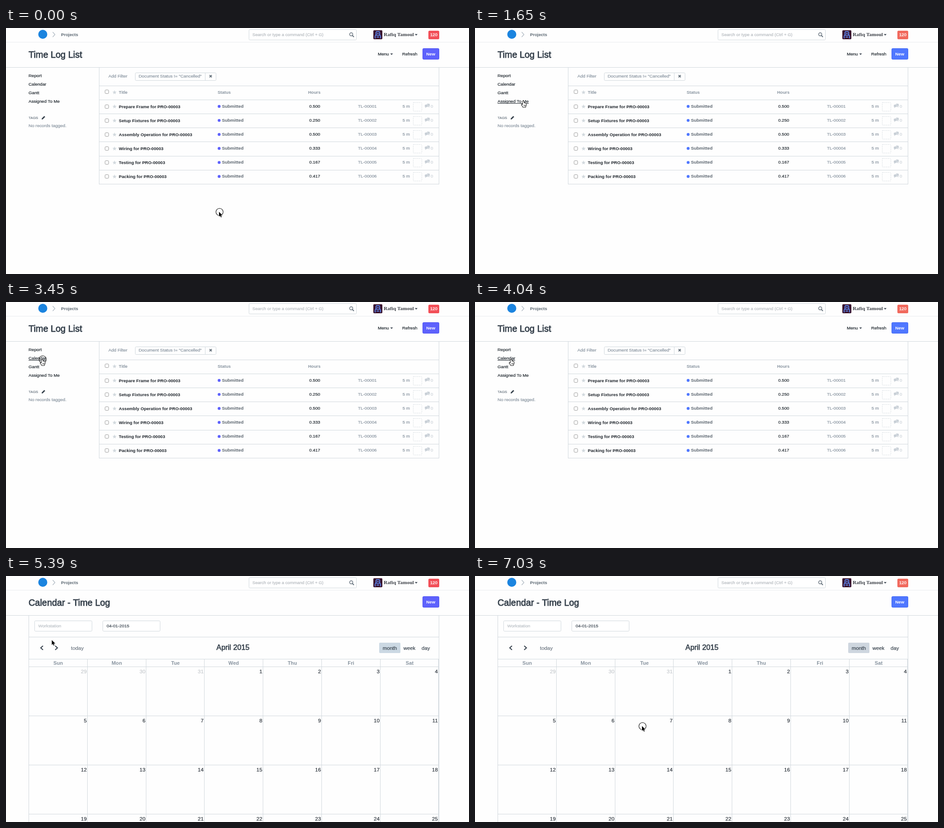
Animation of 1026x546 px, one loop 8 s. Source, as an HTML page with a canvas:

```html
<!DOCTYPE html>
<html lang="en">
<head>
<meta charset="utf-8">
<title>Time log</title>
<style>
  html, body { margin: 0; width: 100%; height: 100%; overflow: hidden; background: #fefefe; }
  canvas { display: block; }
</style>
</head>
<body>
<canvas id="stage" width="1026" height="546"></canvas>
<script>
const ctx = document.getElementById('stage').getContext('2d');
const LOOP = 8000;
const SANS = '"Liberation Sans", Arial, sans-serif';
const SERIF = '"Liberation Serif", serif';
const INK = '#36414c', DARK = '#1f272e', MUTED = '#87939f', LINE = '#d1d8dd', PALE = '#c9d0d7';

const VIOLET = { accent: '#5e62fc', edge: '#4a4ff2', badge: '#f24f58', month: '#cbd8e3' };
const BLUE = { accent: '#4f77ff', edge: '#3f66f4', badge: '#f1695d', month: '#ced6df' };
const themes = [[0, VIOLET], [150, BLUE], [3450, VIOLET], [4040, BLUE], [5390, VIOLET], [7030, BLUE]];

// Each move advances the pointer once per STEP.
const STEP = 148;
const moves = [
  { at: 150, steps: 6, x: 168, y: 278 },
  { at: 1200, steps: 4, x: 107, y: 162 },
  { at: 1800, steps: 3, x: 82, y: 132 },
  { at: 2250, steps: 2, x: 80, y: 127 },
  { at: 5390, steps: 6, x: 370, y: 333 }
];
const clicks = [[0, 150], [3450, 3740], [7030, LOOP]];
const CALENDAR_OPENS = 4340;

const links = [
  { label: 'Report', y: 105, w: 29 },
  { label: 'Calendar', y: 124, w: 39 },
  { label: 'Gantt', y: 143, w: 24 },
  { label: 'Assigned To Me', y: 162, w: 69 }
];
const logs = [
  ['Prepare Frame', '0.500'], ['Setup Fixtures', '0.250'], ['Assembly Operation', '0.500'],
  ['Wiring', '0.333'], ['Testing', '0.167'], ['Packing', '0.417']
];

// Regular text gets a thin outline, which gives it a slightly heavier look.
function text(str, x, y, { size = 9.8, color = INK, weight = '', align = 'left', font = SANS, thicken = weight ? 0 : .22 } = {}) {
  ctx.font = `${weight} ${size}px ${font}`;
  ctx.textAlign = align;
  ctx.fillStyle = ctx.strokeStyle = color;
  ctx.fillText(str, x, y);
  if (thicken) {
    ctx.lineWidth = thicken;
    ctx.lineJoin = 'round';
    ctx.strokeText(str, x, y);
  }
}

function rect(x, y, w, h, color) {
  ctx.fillStyle = color;
  ctx.fillRect(x, y, w, h);
}
const hline = (x1, x2, y, color = LINE) => rect(x1, y, x2 - x1, 1, color);
const vline = (x, y1, y2, color = LINE) => rect(x, y1, 1, y2 - y1, color);

function box(x, y, w, h, r, { fill, stroke } = {}) {
  ctx.beginPath();
  ctx.roundRect(x, y, w, h, r);
  if (fill) { ctx.fillStyle = fill; ctx.fill(); }
  if (stroke) { ctx.strokeStyle = stroke; ctx.lineWidth = 1; ctx.stroke(); }
}

function disc(x, y, r, color) {
  ctx.beginPath();
  ctx.arc(x, y, r, 0, Math.PI * 2);
  ctx.fillStyle = color;
  ctx.fill();
}

function trace(points, x = 0, y = 0) {
  ctx.beginPath();
  points.forEach(([px, py]) => ctx.lineTo(x + px, y + py));
}

function polyline(points, color, width) {
  trace(points);
  ctx.strokeStyle = color;
  ctx.lineWidth = width;
  ctx.lineJoin = 'miter';
  ctx.stroke();
}

function polygon(points, color) {
  trace(points);
  ctx.fillStyle = color;
  ctx.fill();
}

const caret = (x, y) => polygon([[x, y], [x + 6, y], [x + 3, y + 3.2]], INK);

function star(x, y) {
  const points = Array.from({ length: 10 }, (_, i) => {
    const a = i * Math.PI / 5 - Math.PI / 2, r = i % 2 ? 2.1 : 4.9;
    return [x + r * Math.cos(a), y + r * Math.sin(a)];
  });
  polygon(points, LINE);
}

const checkbox = y => box(219.5, y - 4.5, 8, 8, 2, { fill: '#fff', stroke: '#989898' });

function comments(x, y) {
  box(x + 4, y, 7, 6, 2, { fill: PALE });
  polygon([[x + 7, y + 5], [x + 10, y + 5], [x + 10, y + 9]], PALE);
  box(x - .5, y + 1.5, 8, 6.5, 2.5, { fill: '#fefefe' });
  box(x, y + 2, 7, 5.5, 2, { fill: PALE });
  polygon([[x + 1, y + 6], [x + 4, y + 6], [x + 1, y + 10]], PALE);
}

function avatar() {
  box(814, 5, 20, 20, 2, { fill: '#3b1530' });
  const blue = '#5b82e6';
  rect(820, 7, 8, 2, blue);
  rect(819, 9, 2, 6, blue);
  rect(827, 9, 2, 6, blue);
  rect(822, 11, 4, 2, blue);
  rect(818, 15, 12, 2, blue);
  rect(817, 17, 2, 6, blue);
  rect(829, 17, 2, 6, blue);
  rect(821, 19, 6, 2, blue);
}

function header(theme, title) {
  disc(81.5, 14, 10, '#1b84df');
  polyline([[103.5, 9], [108.5, 14.5], [103.5, 20]], '#aeb8c2', 1.3);
  text('Projects', 122, 18, { size: 9.6, weight: 'bold', color: '#5b6772' });

  box(538.5, 3.5, 238, 23, 2, { fill: '#fff', stroke: LINE });
  text('Search or type a command (Ctrl + G)', 546, 18, { size: 9.6, color: '#b4b9be' });
  ctx.beginPath();
  ctx.arc(765, 14, 3.5, 0, Math.PI * 2);
  ctx.strokeStyle = '#65717c';
  ctx.lineWidth = 1.5;
  ctx.stroke();
  polyline([[767.5, 16.5], [771, 20]], '#65717c', 2);

  avatar();
  text('Rafiq Tamoul', 837, 18, { size: 11.4, weight: 'bold', font: SERIF, color: '#3d4148' });
  caret(906, 13.5);
  box(936, 6, 24, 19, 2.5, { fill: theme.badge });
  text('120', 948, 18, { size: 9.7, color: '#fff', align: 'center', thicken: .35 });
  hline(0, 1026, 31, '#e9ecef');

  text(title, 50, 66, { size: 19.9, thicken: .85 });
  box(923.5, 45.5, 36, 24, 2, { fill: theme.accent, stroke: theme.edge });
  text('New', 941.3, 61, { size: 9.7, weight: 'bold', color: '#fff', align: 'center' });
  hline(0, 1026, 87);
}

const isOver = (link, p) => p.x >= 50 && p.x <= 50 + link.w && Math.abs(p.y - link.y) <= 6.5;

function sidebar(pointer) {
  for (const link of links) {
    text(link.label, 50, link.y + 4, { size: 9.7, color: DARK });
    if (isOver(link, pointer)) hline(50, 50 + link.w, link.y + 5, DARK);
  }
  text('TAGS', 50, 202, { size: 8, color: '#6c7883' });
  polyline([[80.5, 201.5], [85.8, 196.2]], INK, 3);
  polygon([[79, 203], [79.6, 200], [82, 202.4]], INK);
  text('No records tagged.', 50, 220, { size: 9.9, color: MUTED });
}

function logRow([name, hours], i, theme) {
  const y = 174.5 + i * 31.1;
  const top = Math.round(y);
  checkbox(top);
  star(240.5, y);
  text(`${name} for PRO-00003`, 250, top + 3, { size: 9.65, weight: 'bold', color: '#20262d' });
  disc(472.3, y - .5, 3.2, theme.accent);
  text('Submitted', 478.5, top + 2, { weight: 'bold', color: '#5c6670' });
  text(hours, 672, top + 2, { size: 9.7, color: DARK });
  text(`TL-0000${i + 1}`, 780, top + 2, { size: 9.7, color: MUTED });
  text('5 m', 895, top + 2, { color: MUTED, align: 'right' });
  ctx.setLineDash([2, 2]);
  box(902.5, top - 9.5, 19, 19, 1, { stroke: LINE });
  ctx.setLineDash([]);
  comments(928, top - 7);
  text('0', 941, top + 2, { color: PALE });
  hline(206, 960, Math.round(190 + i * 31.2));
}

function listPage(theme, pointer) {
  header(theme, 'Time Log List');
  text('Menu', 824, 61, { color: DARK });
  caret(851.5, 56.5);
  text('Refresh', 878, 61, { size: 9.6, color: DARK });
  sidebar(pointer);

  vline(206, 87, 347);
  vline(959, 87, 347);
  text('Add Filter', 227, 110, { color: MUTED });
  box(286.5, 99.5, 179, 17, 2, { stroke: LINE });
  vline(441, 99, 117);
  text('Document Status != "Cancelled"', 294, 110, { color: MUTED });
  polyline([[451, 104.5], [456, 109.5]], '#65717c', 1.8);
  polyline([[456, 104.5], [451, 109.5]], '#65717c', 1.8);
  hline(206, 960, 128);

  checkbox(142);
  star(240.5, 143);
  [['Title', 250], ['Status', 469], ['Hours', 669.5]].forEach(([label, x]) =>
    text(label, x, 146, { size: 9.5, weight: 'bold', color: MUTED }));
  hline(206, 960, 159);
  logs.forEach((log, i) => logRow(log, i, theme));
}

function calendarPage(theme) {
  header(theme, 'Calendar - Time Log');
  vline(50, 87, 546);
  vline(959, 87, 546);
  box(63.5, 99.5, 127, 23, 2, { fill: '#fff', stroke: LINE });
  text('Workstation', 71.5, 114, { size: 9.7, color: '#b9bfc5' });
  box(214.5, 99.5, 127, 23, 2, { fill: '#fff', stroke: LINE });
  text('04-01-2015', 223, 114, { color: INK });
  hline(50, 960, 135);

  polyline([[82, 155], [77, 159.5], [82, 164]], INK, 2.1);
  polyline([[109, 155], [114, 159.5], [109, 164]], INK, 2.1);
  text('today', 144, 164, { size: 11.5, color: '#6c7680' });
  text('April 2015', 503, 164, { size: 16.3, align: 'center', thicken: .7 });
  box(827, 148, 47, 23, 2, { fill: theme.month });
  [['month', 850.5], ['week', 894], ['day', 930.3]].forEach(([label, x]) =>
    text(label, x, 164, { size: 11.4, align: 'center' }));

  const column = i => Math.round(50.4 + i * 129.7);
  [184, 201, 310, 419, 528].forEach(y => hline(50, 959, y));
  ['Sun', 'Mon', 'Tue', 'Wed', 'Thu', 'Fri', 'Sat'].forEach((day, i) => {
    vline(column(i + 1), 184, 546);
    text(day, column(i) + 65.5, 197, { size: 11.2, weight: 'bold', color: MUTED, align: 'center' });
    for (let week = 0; week < 4; week++) {
      const n = week * 7 + i - 2;
      text(n > 0 ? n : n + 31, column(i + 1) - 1.2, Math.round(215.8 + week * 108.9),
        { size: 11.5, align: 'right', color: n > 0 ? '#2b333b' : '#c4c8cc' });
    }
  });
}

function pointerAt(t) {
  let p = { x: 472, y: 408 };
  for (const m of moves) {
    if (t < m.at) break;
    const done = Math.min(m.steps, Math.floor((t - m.at) / STEP) + 1) / m.steps;
    const k = done * done * (3 - 2 * done);
    p = { x: p.x + (m.x - p.x) * k, y: p.y + (m.y - p.y) * k };
  }
  return p;
}

const ARROW = [[0, 0], [0, 10.8], [2.5, 8.4], [4.2, 12.3], [6, 11.5], [4.3, 7.7], [7.7, 7.7]];
const HAND = [[-1.2, 1], [0, 0], [1.1, 1], [1.4, 4.8], [3, 4.5], [4.6, 5.2], [6.2, 6], [6.4, 9],
  [5.2, 11.5], [5, 13.5], [-.8, 13.5], [-1.4, 11.6], [-3.8, 8.6], [-3.3, 7.4], [-1.1, 8.8]];

function drawPointer({ x, y }, hand, pressed) {
  if (pressed) {
    ctx.beginPath();
    ctx.arc(x + 1.2, y + .2, 8, 0, Math.PI * 2);
    ctx.strokeStyle = '#111';
    ctx.lineWidth = 1.1;
    ctx.stroke();
  }
  trace(hand ? HAND : ARROW, x, y);
  ctx.closePath();
  ctx.lineJoin = 'round';
  ctx.lineWidth = hand ? 2 : 1.6;
  ctx.strokeStyle = hand ? '#111' : '#fff';
  ctx.fillStyle = hand ? '#fff' : '#000';
  ctx.stroke();
  ctx.fill();
  if (hand) {
    for (const dx of [1.3, 2.9, 4.5]) vline(x + dx - .3, y + 8.5, y + 11.5, '#555');
  }
}

function draw(t) {
  const theme = themes.filter(([start]) => t >= start).pop()[1];
  const pointer = pointerAt(t);
  const onList = t < CALENDAR_OPENS;
  rect(0, 0, 1026, 546, '#fefefe');
  if (onList) listPage(theme, pointer);
  else calendarPage(theme);
  const hand = onList && links.some(link => isOver(link, pointer));
  drawPointer(pointer, hand, clicks.some(([from, to]) => t >= from && t < to));
}

const start = performance.now();
function tick() {
  draw((performance.now() - start) % LOOP);
  requestAnimationFrame(tick);
}
tick();
</script>
</body>
</html>
```
